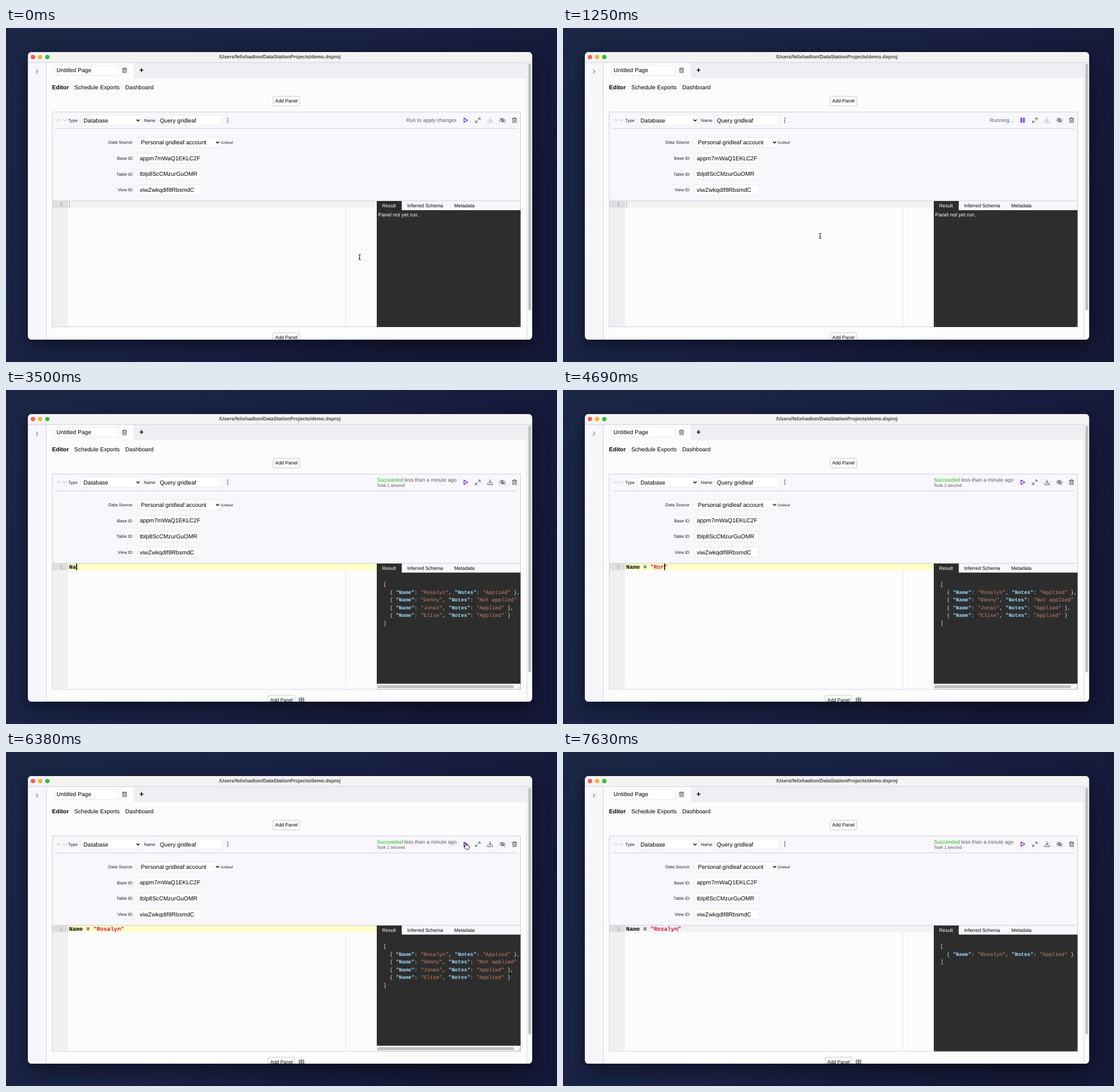
An HTML page that plays this animation: 960 px wide and 583 px high, repeating every 7700 ms.

```html
<!DOCTYPE html>
<html lang="en">
<head>
<meta charset="utf-8">
<title>Query panel demo</title>
<style>
html, body { margin: 0; width: 100%; height: 100%; overflow: hidden; background: #171d3c; }
svg { display: block; width: 960px; height: 583px; }
text { font: 10.1px "Liberation Sans", Arial, sans-serif; white-space: pre; text-rendering: geometricPrecision; }
.label { font-size: 7.55px; fill: #222; }
.end { text-anchor: end; }
.mid { text-anchor: middle; }
.small { font-size: 8.45px; }
.status { font-size: 9.05px; fill: #5c5c62; }
.bold { font-weight: bold; }
.mono { font-family: "Liberation Mono", "Courier New", monospace; }
.code { font-size: 10px; font-weight: bold; }
.json { font-size: 9px; fill: #e0e0e0; }
.key { fill: #9cdcfe; font-weight: bold; }
.str { fill: #ce8467; }
.field { fill: #fff; stroke: #e9e9ef; }
.button { fill: #fff; stroke: #c9c9cf; }
.icon { fill: none; stroke: #505055; stroke-width: 1; stroke-linecap: round; stroke-linejoin: round; }
.line { fill: none; stroke: #d0d0da; }
.run { fill: none; stroke: #7b1fd3; stroke-width: 1.3; stroke-linejoin: round; }
</style>
</head>
<body>
<svg viewBox="0 0 960 583">
  <defs>
    <linearGradient id="sky" x2="1" y2=".45">
      <stop stop-color="#1b2745"/><stop offset=".55" stop-color="#192144"/><stop offset="1" stop-color="#151736"/>
    </linearGradient>
    <clipPath id="frame"><rect x="38.3" y="42" width="878.2" height="502" rx="6"/></clipPath>
    <clipPath id="resultClip"><rect x="646" y="302" width="250.5" height="220"/></clipPath>
    <g id="trash" class="icon"><path d="M-4-2.8H4M-1.5-2.8V-4.2H1.5V-2.8M-3-2.8V4H3V-2.8M-1-.6V2M1-.6V2"/></g>
    <path id="caretDown" d="M-2.6-1.3L0 1.4L2.6-1.3" fill="none" stroke="#111" stroke-width="1.5"/>
    <g id="beam"><path d="M-2.2-4.6Q0-4.6 0-3.4Q0-4.6 2.2-4.6M0-3.4V3.4M-2.2 4.6Q0 4.6 0 3.4Q0 4.6 2.2 4.6M-1 1.2H1" fill="none" stroke="#111"/></g>
    <path id="arrow" d="M0 0V9L2.1 7.1L3.6 10.4L5.1 9.7L3.7 6.5H6.4Z" fill="#000" stroke="#fff" stroke-width=".7"/>
    <path id="hand" d="M-1 .8Q0-.5 1 .8V4Q2 3.2 2.8 4.2Q3.8 3.6 4.6 4.6Q6.2 4.2 6.3 6V8Q6 9 5.2 10.8H.2L-3 7Q-3.4 5.4-1 6.4Z" fill="#fff" stroke="#111" stroke-width=".9"/>
  </defs>

  <rect width="960" height="583" fill="url(#sky)"/>
  <rect x="38.3" y="42" width="878.2" height="502" rx="6" fill="#fcfcfd" style="filter:drop-shadow(0 8px 14px #0007)"/>

  <g clip-path="url(#frame)">
    <rect x="38" y="42" width="879" height="18" fill="#f4f3f4"/>
    <circle cx="47" cy="50.7" r="3.8" fill="#fe5b52"/>
    <circle cx="59.5" cy="50.7" r="3.8" fill="#f8b52a"/>
    <circle cx="72" cy="50.7" r="3.8" fill="#28c13d"/>
    <text class="bold mid" x="477" y="53.4" style="font-size:8.57px" fill="#454545">/Users/felixhadton/DataStationProjects/demo.dsproj</text>

    <rect x="38" y="60" width="32" height="484" fill="#f7f7fb"/>
    <rect x="222.5" y="60" width="685" height="27.5" fill="#efeff3"/>
    <path class="line" d="M38 60.3H917M70.2 60V544M907.8 60V544"/>
    <rect x="908.3" y="61" width="9" height="483" fill="#fafafa"/>
    <rect x="910" y="62" width="5" height="431" rx="2.5" fill="#c0c0c2"/>
    <path class="icon" d="M52.5 72.8L55.7 76L52.5 79.2"/>
    <rect class="field" x="84" y="65" width="112" height="17.5" rx="2"/>
    <text x="88" y="77.2">Untitled Page</text>
    <use href="#trash" x="206.5" y="74"/>
    <path d="M233 73.5H239.4M236.2 70.3V76.7" stroke="#111" stroke-width="1.6"/>

    <text class="bold" x="80.3" y="106.7">Editor</text>
    <text x="119" y="106.7">Schedule Exports</text>
    <text x="207.8" y="106.7">Dashboard</text>
    <rect class="button" x="465.3" y="119.2" width="46.4" height="16.8" rx="2"/>
    <text class="small mid" x="488.5" y="130.4">Add Panel</text>

    <rect id="panel" x="80.5" y="146.7" width="816" height="374.8" fill="#f7f7fc" stroke="#d0d0da"/>
    <path class="icon" stroke-opacity=".4" d="M88.4 162.6L91.4 159.6L94.4 162.6M99.6 159.6L102.6 162.6L105.6 159.6"/>
    <text class="label" x="108.4" y="163.8">Type</text>
    <rect class="field" x="129.7" y="152" width="106" height="17.8" rx="2"/>
    <text x="135" y="164.6">Database</text>
    <use href="#caretDown" x="230" y="161"/>
    <text class="label" x="240.2" y="163.8">Name</text>
    <rect class="field" x="264.7" y="152" width="111.6" height="17.8" rx="2"/>
    <text x="268" y="164.6">Query gridleaf</text>
    <g fill="#444"><circle cx="386.4" cy="157.4" r="1"/><circle cx="386.4" cy="161" r="1"/><circle cx="386.4" cy="164.6" r="1"/></g>

    <text id="idle" class="status end" x="785" y="164.2"></text>
    <g id="done">
      <text class="status end" x="785" y="160"><tspan fill="#2bb91d">Succeeded</tspan> less than a minute ago</text>
      <text class="label" x="646" y="168.8" style="fill:#555">Took 1 second</text>
    </g>
    <path id="play" class="run" d="M798 157.2L804.6 161L798 164.8Z"/>
    <path id="pause" class="run" d="M797.6 157.5H799.5V164.6H797.6ZM802 157.5H803.9V164.6H802Z"/>
    <path class="icon" d="M823 157.2H826V160.2M826 157.2L822.8 160.4M821 164.8H818V161.8M818 164.8L821.2 161.6"/>
    <path id="download" class="icon" d="M843.4 156.8V162.4M841 160.2L843.4 162.6L845.8 160.2M839.4 162.4V165.2H847.4V162.4"/>
    <path class="icon" d="M860 161Q865 154.6 870 161Q865 167.4 860 161M861 157L869.2 165.4"/><circle class="icon" cx="865" cy="161" r="1.5"/>
    <use href="#trash" x="886" y="161"/>

    <g id="body">
      <path class="line" d="M86 175.4H891.3"/>
      <g id="fields"></g>
      <rect x="81" y="302" width="564.5" height="219" fill="#fcfcfd"/>
      <rect x="81" y="302" width="27" height="219" fill="#f0f0f2"/>
      <rect x="81" y="302" width="27" height="11.8" fill="#dedee0"/>
      <path d="M592.5 302V521" stroke="#e7e7ea"/>
      <rect id="active" x="108" y="302" width="537.5" height="11.8"/>
      <text class="mono end" x="99.6" y="311" style="font-size:9.6px" fill="#98989c">1</text>
      <text id="code" class="mono code" x="110" y="311"></text>
      <rect id="caret" y="302.3" height="11.5"/>
      <path class="line" d="M81 301.8H896.5"/>

      <g clip-path="url(#resultClip)">
        <rect x="646" y="318" width="251" height="204" fill="#2d2d2d"/>
        <rect x="646" y="302" width="43.5" height="17" fill="#2d2d2d"/>
        <text class="small" x="655.4" y="312.9" fill="#fff">Result</text>
        <text class="small" x="699" y="312.9">Inferred Schema</text>
        <text class="small" x="781" y="312.9">Metadata</text>
        <g id="result"></g>
        <g id="scroll">
          <rect x="646" y="512" width="251" height="10" fill="#f8f8f9"/>
          <rect x="647" y="514.6" width="238" height="5.2" rx="2.6" fill="#c0c0c2"/>
        </g>
        <path d="M892 520.6L895.8 516.8M894.4 520.6L895.8 519.2M647 517.8L649.6 520.4" stroke="#888" stroke-width=".6"/>
      </g>

      <g id="add">
        <rect class="button" x="465.3" y="532.2" width="46.4" height="16.8" rx="2"/>
        <text class="small mid" x="488.5" y="543.4">Add Panel</text>
        <path id="table" class="icon" d="M519.6 537H527.4V544.6H519.6ZM519.6 539.6H527.4M523.5 537V544.6M519.6 542.2H527.4"/>
      </g>
    </g>
  </g>
  <use id="cursor"/>
</svg>
<script>
const LOOP = 7700, NAME = 'Rosalyn';
const $ = id => document.getElementById(id);
const set = (id, attrs) => { for (const k in attrs) $(id).setAttribute(k, attrs[k]); };
const show = (id, on) => set(id, { visibility: on ? 'visible' : 'hidden' });

// Form rows
const rows = [['Data Source', 'Personal gridleaf account'], ['Base ID', 'appm7mWaQ1EKLC2F'],
  ['Table ID', 'tblp8ScCMzurGuOMR'], ['View ID', 'viwZwkqdIf8RbsmdC']];
$('fields').innerHTML = rows.map(([label, value], i) => {
  const y = 199.7 + i * 27.6;
  return `<text class="label end" x="220.3" y="${y + 2.7}">${label}</text>
    <rect class="field" x="229.7" y="${y - 8.8}" width="${i ? 111.4 : 144.6}" height="17.6" rx="2"/>
    <text x="${i ? 233 : 235.2}" y="${y + 3.5}">${value}</text>`;
}).join('') + `<use href="#caretDown" x="368.6" y="199.6"/>
  <text class="label" x="374" y="202.2" style="font-size:6.1px">Gridleaf</text>`;

// Result views
const people = [[NAME, 'Applied'], ['Denny', 'Not applied'], ['Jonas', 'Applied'], ['Elise', 'Applied']];
const pair = (key, value) => `<tspan class="key">"${key}"</tspan>: <tspan class="str">"${value}"</tspan>`;
const json = list => ['[', ...list.map(([name, notes], i) =>
  `  { ${pair('Name', name)}, ${pair('Notes', notes)} }${i < list.length - 1 ? ',' : ''}`), ']']
  .map((s, i) => `<text class="mono json" x="657.6" y="${341.4 + i * 13.5}">${s}</text>`).join('');
const results = ['<text x="648.6" y="328.8" style="font-size:9px" fill="#fff">Panel not yet run.</text>',
  json(people), json(people.slice(0, 1))];

// Typing: each entry is [time, text before caret]
const keys = [[0, '']];
const type = (start, step, texts) => texts.forEach((s, i) => keys.push([start + i * step, s]));
const prefixes = (s, from) => [...s].map((_, i) => s.slice(0, i + 1)).slice(from);
const head = 'Name = "', typo = head + 'Ror';
type(3320, 150, prefixes('Name', 0));
type(4060, 90, prefixes(typo, 4));
type(4880, 63, [2, 1, 0].map(n => typo.slice(0, head.length + n)).concat(prefixes(head + NAME, head.length)));

const path = [[0, 616, 400], [60, 616, 400], [500, 801, 159], [690, 801, 159], [810, 638, 259], [1150, 448, 363],
  [5690, 448, 363], [6000, 789, 167], [6200, 801, 159], [7230, 801, 159], [7310, 822, 118], [7630, 757, 349], [LOOP, 757, 349]];

function pointer(t) {
  const i = path.findIndex(p => p[0] > t), [t0, x0, y0] = path[i - 1], [t1, x1, y1] = path[i];
  const u = (t - t0) / (t1 - t0);
  return [x0 + (x1 - x0) * u, y0 + (y1 - y0) * u];
}

let shown = -1;
function draw(now) {
  const t = now % LOOP;
  const running = t >= 690 && t < 1300 || t >= 6400 && t < 7170;
  const done = t >= 1300 && !running;
  const result = t < 1300 ? 0 : t < 7170 ? 1 : 2;
  const focused = t >= 1500 && t < 6400;
  const dy = done ? .7 : 0;

  set('body', { transform: `translate(0 ${dy})` });
  set('panel', { height: 374.8 + dy });
  $('idle').textContent = running ? 'Running...' : 'Run to apply changes';
  show('idle', !done);
  show('done', done);
  show('play', !running);
  show('pause', running);
  set('download', { opacity: result ? 1 : .4 });
  show('scroll', result === 1);
  show('table', result);
  set('add', { transform: `translate(${result ? -8.5 : 0} 0)` });
  if (shown !== result) $('result').innerHTML = results[shown = result];

  const [since, typed] = keys.filter(k => k[0] <= t).pop();
  const closed = typed.includes('"') ? typed + '"' : typed;
  const quote = closed.indexOf('"');
  $('code').innerHTML = quote < 0 ? closed
    : closed.slice(0, quote) + `<tspan fill="#d2183c">${closed.slice(quote)}</tspan>`;
  set('active', { fill: focused ? '#ffffc6' : '#f2f2f3' });
  set('caret', { x: 110.3 + typed.length * 6, width: focused ? 1.6 : .8, fill: focused ? '#000' : '#999' });
  show('caret', !focused || (t - Math.max(since, 1500)) % 1000 < 500);

  const [x, y] = pointer(t);
  const onButton = Math.abs(x - 801) < 7 && y > 154 && y < 169;
  const kind = onButton ? 'hand' : y > 302 && x < 645 ? 'beam' : 'arrow';
  set('cursor', { href: '#' + kind, transform: `translate(${x} ${y})` });
  show('cursor', !(t >= 3320 && t < 5690) && t < 7600);
  requestAnimationFrame(draw);
}
requestAnimationFrame(draw);
</script>
</body>
</html>
```
